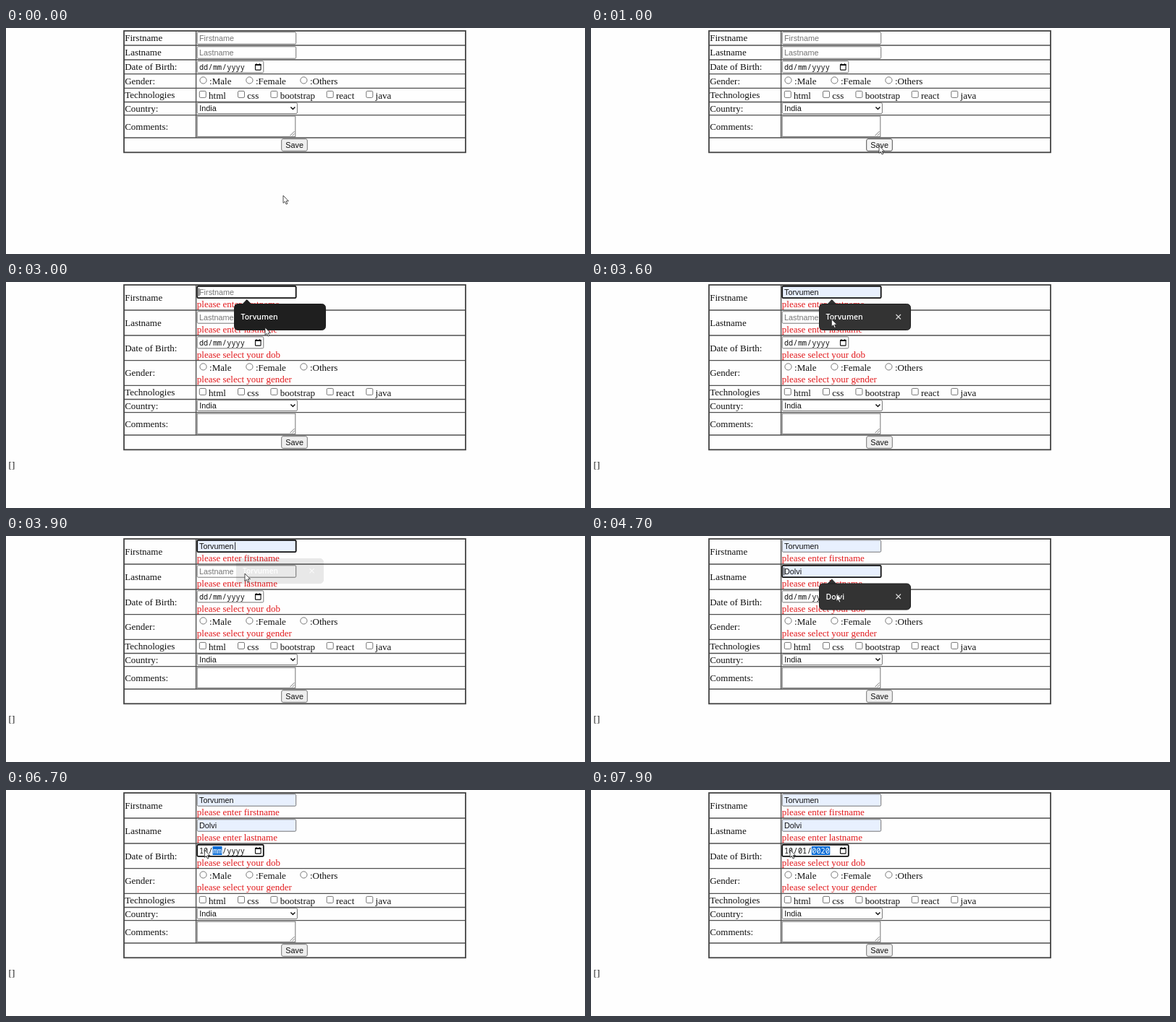
An HTML page for the animation above (8000 ms loop, 800x313 px).

```html
<!DOCTYPE html>
<html lang="en">
<head>
<meta charset="utf-8">
<title>Form validation</title>
<style>
  html, body { margin: 0; height: 100%; overflow: hidden; background: #fefefe; }
  svg { display: block; width: 100vw; height: 100vh; }
  text { font: 13px "Liberation Serif", serif; fill: #111; white-space: pre; }
  .ui { font: 10.83px "Liberation Sans", sans-serif; }
  .mono { font: 10.2px "Noto Sans Mono", monospace; }
  .tip { font: 600 10.5px "Open Sans", sans-serif; }
</style>
</head>
<body>
<svg id="stage" viewBox="0 0 800 313"></svg>
<script>
const LOOP = 8000, SUBMIT = 1200;
const FIRST = 'Torvumen', LAST = 'Dolvi';
const stage = document.getElementById('stage');

// time, x, y of the pointer tip
const pointer = [
  [0, 383, 232], [200, 383, 232], [700, 398, 163], [1200, 398, 163], [1800, 302, 16],
  [2100, 302, 16], [2800, 358, 63], [3000, 358, 63], [3300, 345, 48], [3700, 330, 52],
  [3900, 330, 52], [4200, 312, 49], [4400, 312, 49], [4700, 339, 80], [5100, 339, 80],
  [5500, 292, 84], [5800, 274, 83], [LOOP, 275, 83]
];

// time, day, month, year, selected part
const dates = [
  [0, 'dd', 'mm', 'yyyy', -1], [5800, 'dd', 'mm', 'yyyy', 0], [6400, '01', 'mm', 'yyyy', 0],
  [6700, '10', 'mm', 'yyyy', 1], [7000, '10', '00', 'yyyy', 1], [7200, '10', '01', 'yyyy', 2],
  [7500, '10', '01', '0002', 2], [7700, '10', '01', '0020', 2]
];

const text = (x, y, s, cls = '', fill = '#111') =>
  `<text x="${x}" y="${y}" class="${cls}" style="fill:${fill}">${s}</text>`;
const box = (x, y, w, h, fill = '#fff', stroke = '#767676', width = 1, r = 1.5) =>
  `<rect x="${x}" y="${y}" width="${w}" height="${h}" rx="${r}" fill="${fill}" stroke="${stroke}" stroke-width="${width}"/>`;
const path = (d, stroke = '#555', width = 1, fill = 'none') =>
  `<path d="${d}" stroke="${stroke}" stroke-width="${width}" fill="${fill}"/>`;
const within = (t, a, b) => t >= a && t < b;

function pointerAt(t) {
  const i = pointer.findIndex(p => p[0] > t);
  const [t0, x0, y0] = pointer[i - 1], [t1, x1, y1] = pointer[i];
  const u = (t - t0) / (t1 - t0), k = u * u * (3 - 2 * u);
  return [x0 + (x1 - x0) * k, y0 + (y1 - y0) * k];
}

function field(y, hint, value, focused, filled, caretX) {
  const edge = focused ? ['#111', 1.8] : ['#767676', 1];
  return box(264.2, y + 1.8, 136.5, 16.4, filled ? '#e8f0fe' : '#fff', ...edge) +
    text(267, y + 13.9, value || hint, 'ui', value ? '#111' : '#757575') +
    (caretX ? path(`M${caretX} ${y + 4.5}v11`, '#111', .9) : '');
}

function dateField(y, t) {
  const [, d, m, yr, sel] = dates.filter(e => e[0] <= t).pop();
  const xs = [267, 286, 305.3];
  let s = box(264.2, y + 1.9, 91.6, 16, '#fff', sel < 0 ? '#767676' : '#111', sel < 0 ? 1 : 1.8);
  [d, m, yr].forEach((part, i) => {
    const on = i === sel;
    if (on) s += box(xs[i] - .5, y + 4, i < 2 ? 13 : 25.5, 12, '#0a6cd6', 'none', 0, 0);
    s += text(xs[i], y + 13.6, part, 'mono', on ? '#fff' : '#111');
  });
  s += text(279.5, y + 13.6, '/', 'mono') + text(298.8, y + 13.6, '/', 'mono');
  return s + box(344.5, y + 6.5, 7.6, 7.6, '#fff', '#111', 1.1, .5) +
    path(`M344 ${y + 7}h8.6`, '#111', 2) + path(`M346 ${y + 5}v2M350.6 ${y + 5}v2`, '#111');
}

function popup(y, name, hover, fading) {
  const fill = hover ? '#333' : '#1f1f1f';
  const shape = fading ? 'opacity=".1" transform="translate(378.5 48.5) scale(.953) translate(-378.5 -48.5)"' : '';
  return `<g transform="translate(0 ${y})"><g ${shape}>` +
    path('M326 31L332.8 24L339.6 31Z', 'none', 0, fill) +
    box(315.5, 30.5, 126, 36, fill, '#1f1f1f', 1, 5) +
    text(324.5, 52, name, 'tip', '#fff') +
    (hover ? path('M421.5 45l6.5 6.5m0 -6.5l-6.5 6.5', '#ddd', 1.1) : '') + '</g></g>';
}

function arrow(x, y) {
  return path(`M${x} ${y}v10.4l2.4 -2.1l1.7 3.8l1.7 -.8l-1.6 -3.6h3.2Z`, '#222', .8, '#fff');
}

function beam(x, y) {
  return path(`M${x - 2.5} ${y - 5.5}h2l.5 .7l.5 -.7h2M${x} ${y - 5}v10.5M${x - 2.5} ${y + 6}h2l.5 -.7l.5 .7h2`, '#222', .9);
}

function draw(t) {
  const sent = t >= SUBMIT;
  const rows = [4, 24, 44, 63.6, 83.4, 102.5, 120.6, 152, 172.3]
    .map((y, i) => y + (sent ? 15 * Math.min(i, 4) : 0));
  let s = path(`M262.6 4V${rows[7]}` + rows.slice(1, 8).map(y => `M163 ${y}H635`).join(''), '#505050', 1.4) +
    box(163, 4, 472, rows[8] - 4, 'none', '#444', 1.8, 0);

  ['Firstname', 'Lastname', 'Date of Birth:', 'Gender:', 'Technologies', 'Country:', 'Comments:'].forEach((label, i) => {
    s += text(164.2, (rows[i] + rows[i + 1]) / 2 + 4.4, label);
  });

  const blink = start => (t - start) % 1000 < 500;
  const firstFocus = within(t, 2000, 4300), lastFocus = within(t, 4300, 5800);
  const firstShown = within(t, 3300, 3700) || t >= 3700;
  const lastShown = t >= 4600;
  const firstCaret = firstFocus && blink(t < 3800 ? 2000 : 3800) && (t < 3800 ? 266.6 : 316.6);
  const lastCaret = lastFocus && blink(t < 5100 ? 4300 : 5100) && (t < 5100 ? 266.6 : 291.4);
  s += field(rows[0], 'Firstname', firstShown && FIRST, firstFocus, firstShown, firstCaret);
  s += field(rows[1], 'Lastname', lastShown && LAST, lastFocus, lastShown, lastCaret);
  if (within(t, 5100, 5800)) s += path(`M267 ${rows[1] + 16}` + 'q1 -2 2 0t2 0'.repeat(6), '#e33', .8);
  s += dateField(rows[2], t);

  [[272.5, 'Male'], [336.4, 'Female'], [411.4, 'Others']].forEach(([x, label]) => {
    s += `<circle cx="${x}" cy="${rows[3] + 8.8}" r="4.6" fill="#fff" stroke="#767676"/>` +
      text(x + 8.6, rows[3] + 14.2, ':' + label);
  });
  [[267.3, 'html'], [320.5, 'css'], [365.9, 'bootstrap'], [443.2, 'react'], [497.8, 'java']].forEach(([x, label]) => {
    s += box(x, rows[4] + 4, 9, 9, '#fff', '#767676', 1, 1.5) + text(x + 12.8, rows[4] + 14.2, label);
  });

  s += box(264.2, rows[5] + 1.2, 138.2, 14.8) + text(267.3, rows[5] + 12.4, 'India', 'ui') +
    path(`M393.4 ${rows[5] + 7}l3 3l3 -3`, '#111', 1.5);
  s += box(264.2, rows[6] + 1.6, 135.6, 28.2, '#fff', '#767676', 1, 0) +
    path(`M392.5 ${rows[6] + 28.5}l6 -6m-2.8 6l2.8 -2.8`, '#666', .9);

  const over = within(t, 600, 1300), down = t === 1000;
  s += box(380.7, rows[7] + 1.7, 35.6, 16.6, down ? '#f5f5f5' : over ? '#e3e3e3' : '#efefef', over ? '#4f4f4f' : '#767676', 1, 2.2) +
    text(386.3, rows[7] + 13.8, 'Save', 'ui');

  if (sent) {
    ['enter firstname', 'enter lastname', 'select your dob', 'select your gender'].forEach((what, i) => {
      s += text(263.8, rows[i] + 30.6, 'please ' + what, '', '#e2191c');
    });
    s += text(3.6, 258.3, '[]');
  }

  if (within(t, 2000, 4000)) s += popup(0, FIRST, t >= 3200, t >= 3900);
  if (within(t, 4400, 5300)) s += popup(35.5, LAST, t >= 4600, t >= 5200);

  const [x, y] = pointerAt(t);
  const typing = within(t, 1800, 2200) || within(t, 4200, 4500);
  stage.innerHTML = s + (typing ? beam(x, y) : arrow(x, y));
}

let shown = -1;
function tick() {
  const t = Math.floor(performance.now() % LOOP / 100) * 100;
  if (t !== shown) draw(shown = t);
  requestAnimationFrame(tick);
}
tick();
</script>
</body>
</html>
```
